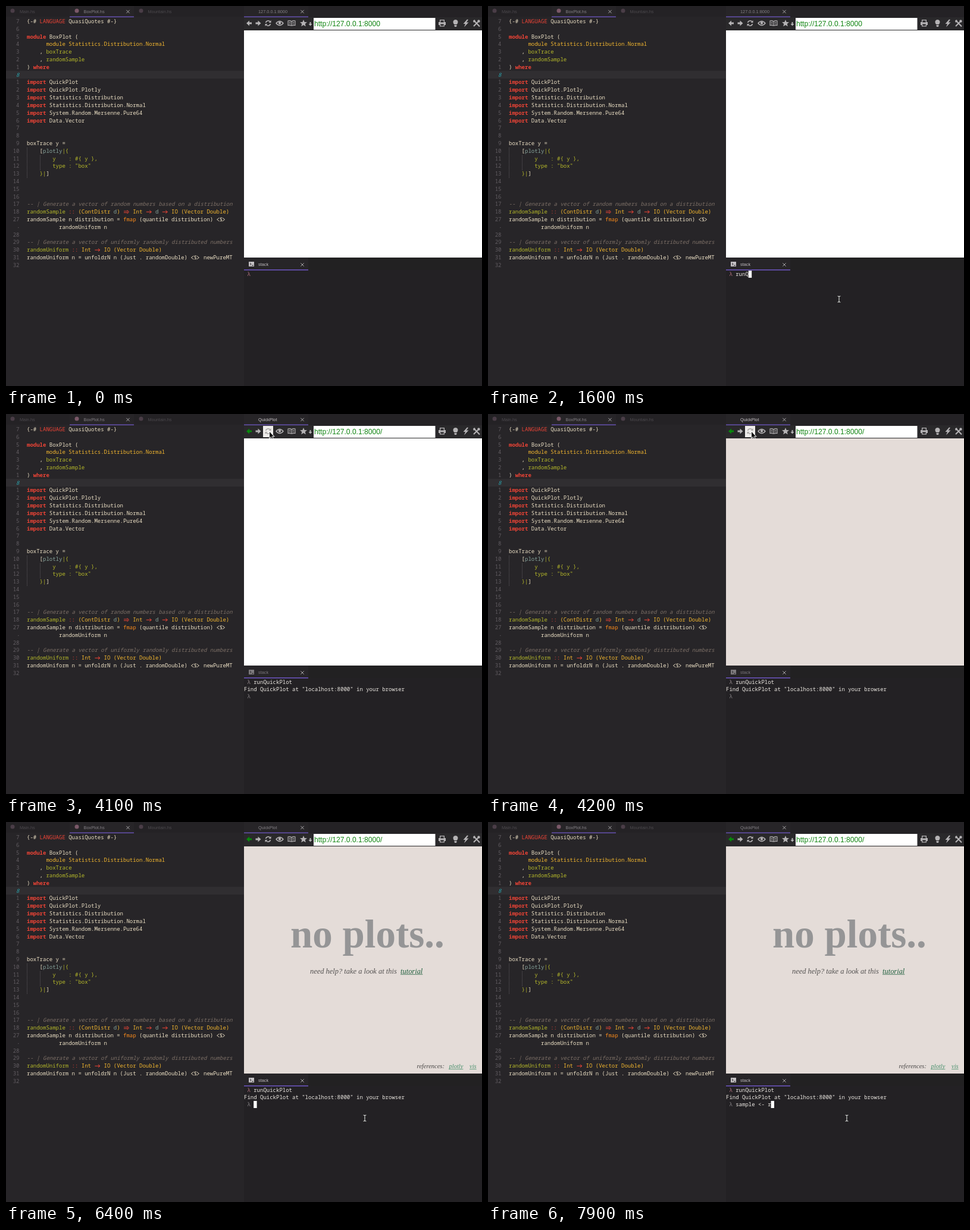
Write an HTML page with a canvas that moves like this. It is 800 px wide and 639 px high and loops after 8 s.

```html
<!DOCTYPE html>
<html lang="en">
<head>
<meta charset="utf-8">
<title>Editor, browser and terminal</title>
<style>
html, body { margin: 0; width: 100%; height: 100%; overflow: hidden; background: #272528; }
canvas { display: block; }
</style>
</head>
<body>
<canvas id="stage" width="800" height="639"></canvas>
<script>
const g = document.getElementById('stage').getContext('2d');
const LOOP = 8000, CELL = 5.4, ROW = 12.81;
const MONO = '"Noto Sans Mono", "DejaVu Sans Mono", monospace';
const SANS = '"Liberation Sans", Arial, sans-serif';
const SERIF = '"Liberation Serif", "Times New Roman", serif';

// A backtick and a letter switch the colour of the code that follows.
const COLORS = { w: '#ebdfc4', r: '#ee4436', y: '#f2b62f', g: '#b5b82a', o: '#f98a1c', b: '#86a39a', c: '#7d7067' };
const CODE = [
  '{-# `rLANGUAGE`w QuasiQuotes #-}', '',
  '`kmodule`w BoxPlot (',
  '      `ymodule Statistics.Distribution.Normal',
  '    , `gboxTrace',
  '    , `grandomSample',
  ') `kwhere', '',
  '`kimport`w QuickPlot',
  '`kimport`w QuickPlot.Plotly',
  '`kimport`w Statistics.Distribution',
  '`kimport`w Statistics.Distribution.Normal',
  '`kimport`w System.Random.Mersenne.Pure64',
  '`kimport`w Data.Vector', '', '',
  'boxTrace y =',
  '    [`bplotly`g|{',
  '        `gy    : #{ y },',
  '        `gtype : "box"',
  '    `g}|`w]', '', '', '',
  '`c-- | Generate a vector of random numbers based on a distribution',
  '`grandomSample `r::`y (ContDistr `bd`y) `r=>`y Int `r->`b d `r->`y IO (Vector Double)',
  'randomSample n distribution = `ofmap`w (quantile distribution) <$>',
  '          randomUniform n', '',
  '`c-- | Generate a vector of uniformly randomly distributed numbers',
  '`grandomUniform `r::`y Int `r->`y IO (Vector Double)',
  'randomUniform n = unfoldrN n (Just . randomDouble) <$> newPureMT', ''
];

const rect = (x, y, w, h, color) => { g.fillStyle = color; g.fillRect(x, y, w, h); };

function text(str, x, y, font, color, align = 'left') {
  g.font = font;
  g.fillStyle = color;
  g.textAlign = align;
  g.fillText(str, x, y);
}

function shape(x, y, d, color, width) {
  g.save();
  g.translate(x, y);
  const path = new Path2D(d);
  if (width) {
    g.strokeStyle = color;
    g.lineWidth = width;
    g.stroke(path);
  } else {
    g.fillStyle = color;
    g.fill(path, 'evenodd');
  }
  g.restore();
}

function dot(x, y, r, color) {
  g.fillStyle = color;
  g.beginPath();
  g.arc(x, y, r, 0, 7);
  g.fill();
}

const close = (x, y) => shape(x, y, 'M-2.7-2.7L2.7 2.7M2.7-2.7L-2.7 2.7', '#aaa8aa', 1);
const label = (str, x, y, color) => text(str, x, y, '7.35px ' + SANS, color);

function codeLine(line, row) {
  const y = 29 + row * ROW;
  let col = 0;
  ('`w' + line).split('`').slice(1).forEach(part => {
    const key = part[0], color = COLORS[key] || COLORS.r;
    const style = key === 'k' ? 'bold ' : key === 'c' ? 'italic ' : '';
    part.slice(1).split(/(=>|->|<\$>)/).forEach(s => {
      const x = 35 + col * CELL;
      if (s === '->') shape(x, y - 3, 'M1 0H9.5M6.5-2.5L9.5 0L6.5 2.5', color, 1);
      else if (s === '=>') shape(x, y - 3, 'M1-1.2H8.5M1 1.2H8.5M6.5-3L9.5 0L6.5 3', color, .9);
      else if (s === '<$>') {
        shape(x, y - 3, 'M5-3L1 0L5 3M10-3L14 0L10 3', color, .9);
        text('$', x + CELL, y, '8px ' + MONO, color);
      } else text(s, x, y, style + '9px ' + MONO, color);
      col += s.length;
    });
  });
}

function lineNumber(row) {
  if (row < 7) return 7 - row;
  if (row === 7) return 8;
  if (row < 26) return row - 7;
  return row === 26 ? 27 : row === 27 ? '•' : row;
}

function editor() {
  rect(0, 0, 400, 639, '#272528');
  rect(0, 0, 400, 18, '#242225');
  rect(107, 0, 108, 18, '#272528');
  rect(107, 17.5, 108, 1.5, '#6550ad');
  [[11, '#4a3d47'], [119, '#7a5868'], [227, '#4a3d47']].forEach(([x, color]) => dot(x, 8, 3.5, color));
  label('Main.hs', 23, 11.5, '#4c494d');
  label('BoxPlot.hs', 130.5, 11.5, '#858186');
  label('Mountain.hs', 238.5, 11.5, '#4c494d');
  close(205, 9.5);
  rect(0, 109, 400, 13, '#302e31');
  g.setLineDash([1, 1]);
  shape(35.5, 238, 'M0 0V51M22 13V38', '#5a565b', 1);
  g.setLineDash([]);
  CODE.forEach((line, row) => {
    const here = row === 7;
    text(lineNumber(row), 22.5, 29 + row * ROW, (here ? 'italic ' : '') + (row === 27 ? 6 : 9) + 'px ' + MONO,
      here ? '#2aa3ad' : '#625d62', 'right');
    codeLine(line, row);
  });
}

function toolbar(t) {
  const icon = '#b5b3b5', hover = t >= 3600 && t < 4700;
  shape(404, 29, 'M0 0L5-4.5V-1.5H9V1.5H5V4.5Z', t >= 4000 ? '#078a0b' : icon);
  shape(428.5, 29, 'M0 0L-5-4.5V-1.5H-9V1.5H-5V4.5Z', icon);
  if (hover) rect(432, 20, 17, 19, '#efedeb');
  const spin = hover ? '#aaa8a6' : icon;
  shape(440.5, 29, 'M-4-1A4.2 4.2 0 0 1 3-3M4 1A4.2 4.2 0 0 1-3 3', spin, 1.6);
  shape(440.5, 29, 'M5-5V-1H1ZM-5 5V1H-1Z', spin);
  shape(460, 29, 'M-6 0Q0-7 6 0Q0 7-6 0Z', icon, 1.4);
  dot(460, 28.5, 2.2, icon);
  shape(480, 29, 'M0-3Q-3-5-6-4V3.5Q-3 3 0 4Q3 3 6 3.5V-4Q3-5 0-3V4M-4.5-1.5H-1.5M-4.5 1H-1.5M1.5-1.5H4.5M1.5 1H4.5', icon, 1.1);
  shape(500, 29, 'M0-6L1.7-2L6-1.7L2.7 1L3.8 5.3L0 3L-3.8 5.3L-2.7 1L-6-1.7L-1.7-2Z', icon);
  shape(511.5, 30, 'M-1-3H1V0H3L0 3.5L-3 0H-1Z', icon);
  rect(517, 20, 204.5, 20, '#fff');
  text('http://127.0.0.1:8000' + (t >= 4000 ? '/' : ''), 518, 34, '12.1px ' + SANS, '#118512');
  shape(733, 29, 'M-4-6H4V-2H6V3H4V5.5H-4V3H-6V-2H-4ZM-2.7-4.7V-1.5H2.7V-4.7ZM-2.7 1.5V4.2H2.7V1.5Z', icon);
  shape(755.5, 29, 'M-2 2Q-4.5-.5-4-3Q-3-6 0-6Q3-6 4-3Q4.5-.5 2 2ZM-2 3H2V5L1 6H-1L-2 5Z', icon);
  shape(773, 29, 'M2-6.5L-4.5 1H-1L-3 6.5L4.5-1.5H.8L4-6Z', icon);
  shape(791, 29, 'M-5-5L5 5.5M5-5L-5 5', icon, 2);
  shape(791, 29, 'M-6-4L-3-6L-2-3L-5-1ZM3-6L6-3L4-1L1-4Z', icon);
}

function link(str, x, y, size, color) {
  text(str, x, y, `italic ${size}px ${SERIF}`, color);
  rect(x, y + 1.3, g.measureText(str).width, .8, color);
}

function page(t) {
  rect(400, 41, 400, 382, t >= 4150 ? '#e4dcd8' : '#fff');
  g.globalAlpha = Math.max(0, Math.min(1, (t - 4500) / 1100));
  text('no plots..', 478, 211, 'bold 67px ' + SERIF, '#959596');
  text('need help? take a look at this', 511, 254.5, 'italic 12.45px ' + SERIF, '#555352');
  link('tutorial', 663, 254.5, 12.45, '#22603f');
  text('references:', 690.5, 414, 'italic 10.5px ' + SERIF, '#4b4948');
  link('plotly', 744.5, 414, 10.5, '#48906c');
  link('vis', 779, 414, 10.5, '#48906c');
  g.globalAlpha = 1;
}

function browser(t, focus) {
  rect(400, 0, 400, 41, '#242225');
  rect(400, 0, 108, 18, '#272528');
  rect(400, 19, 400, 22, '#2a292b');
  rect(400, 17.5, 108, 1.5, '#6550ad');
  label(t >= 4000 ? 'QuickPlot' : '127.0.0.1:8000', 424, 11.5, focus ? '#c9c5c8' : '#858186');
  close(498, 9.5);
  toolbar(t);
  page(t);
}

const typed = (str, t, start, step) => str.slice(0, Math.max(0, Math.floor((t - start) / step) + 1));

function terminal(t, focus) {
  rect(400, 423, 400, 216, '#232124');
  rect(400, 423, 400, 21, '#222122');
  rect(400, 423, 108, 21, '#272528');
  rect(400, 443, 108, 1.5, '#6f57c4');
  rect(408, 430, 9, 8, focus ? '#c4c1c4' : '#7e7b7e');
  shape(410, 432, 'M0 0L2 2L0 4M3 4.2H6', '#272528', 1);
  label('stack', 424, 437, focus ? '#c0bcbf' : '#7b777b');
  close(498, 435);

  const print = (str, col, row, color = '#ece8e2') =>
    text(str, 400 + col * CELL, 453.8 + row * 12.2, '9px ' + MONO, color);
  const command = typed('runQuickPlot', t, 1250, 95);
  const next = typed('sample <- r', t, 6900, 90);
  const done = t >= 2500;
  print('λ', 1, 0, focus ? '#b0727d' : '#958a8d');
  print(command, 3, 0);
  if (done) {
    print('Find QuickPlot at "localhost:8000" in your browser', 0, 1);
    print('λ', 1, 2, '#858084');
    print(next, 3, 2);
  }
  if (focus && t >= 500) {
    const col = 3 + (done ? next : command).length;
    rect(400 + col * CELL, done ? 469 : 445, CELL, 12, '#fff');
  }
}

// Pointer stops: time, x, y
const PATH = [[400, 590, 493], [2700, 590, 493], [3000, 595, 343], [3600, 443, 30],
  [4600, 443, 30], [5200, 603, 498], [LOOP, 603, 498]];

function pointer(t) {
  const i = PATH.findIndex(p => p[0] > t);
  if (i < 1) return;
  const [t0, x0, y0] = PATH[i - 1], [t1, x1, y1] = PATH[i];
  const u = (t - t0) / (t1 - t0), k = u * u * (3 - 2 * u);
  const x = x0 + (x1 - x0) * k, y = y0 + (y1 - y0) * k;
  if (y > 444) {
    const beam = 'M-2.5-5H-1L0-4L1-5H2.5M0-4V4M-2.5 5H-1L0 4L1 5H2.5';
    shape(x, y, beam, '#111', 2.6);
    shape(x, y, beam, '#eee', 1.1);
  } else {
    const arrow = 'M0 0V10L2.3 8L4 11.5L5.5 10.8L4 7.4H7Z';
    shape(x, y, arrow, '#fff', 1.6);
    shape(x, y, arrow, '#111');
  }
}

function frame(now) {
  const t = now % LOOP, termFocus = t < 3800 || t >= 5300;
  editor();
  browser(t, !termFocus);
  terminal(t, termFocus);
  pointer(t);
  requestAnimationFrame(frame);
}
requestAnimationFrame(frame);
</script>
</body>
</html>
```
